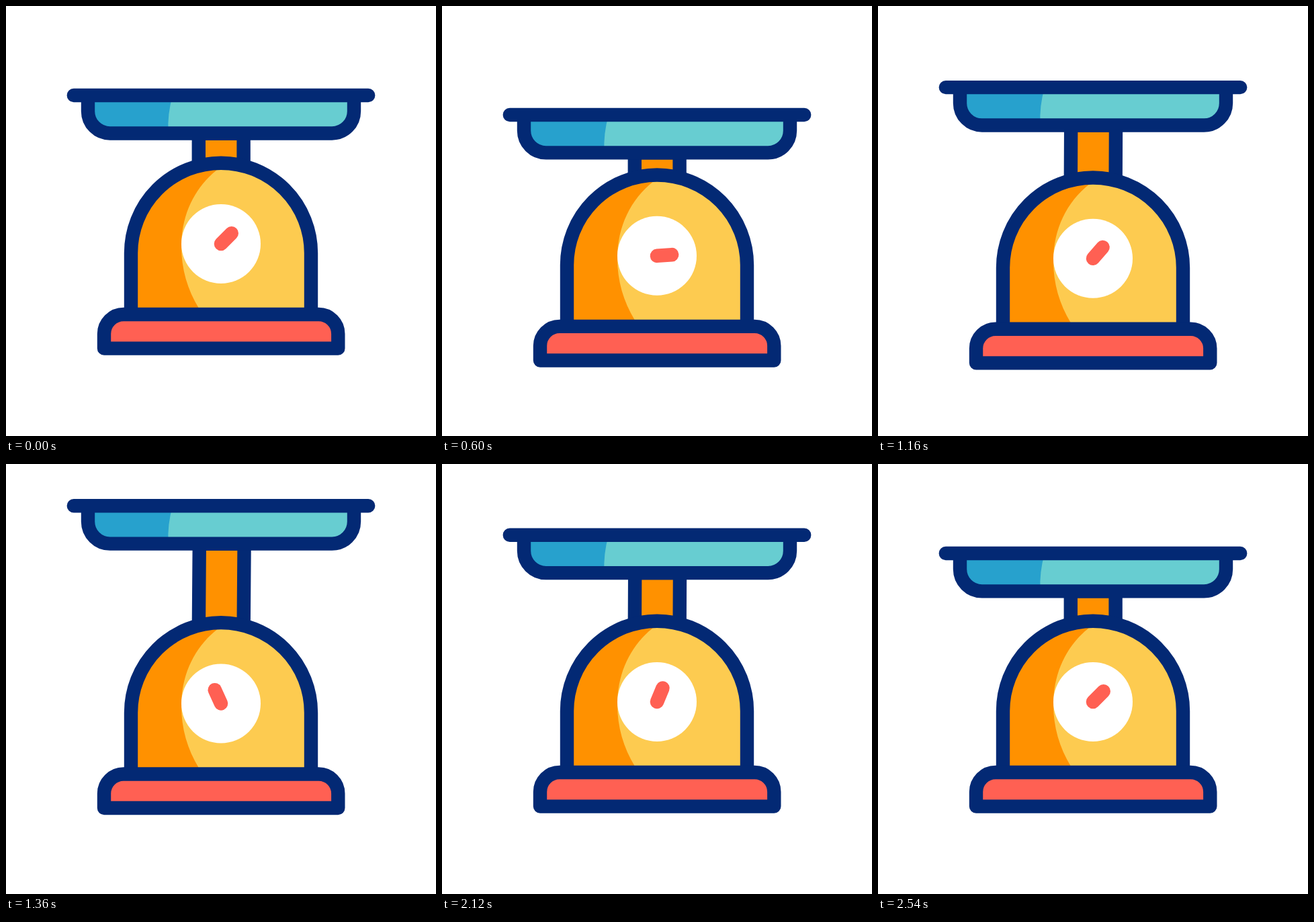
Write an HTML page that moves like this. It is 640 px wide and 640 px high and loops after 2.56 s.

```html
<!DOCTYPE html>
<html lang="en">
<head>
<meta charset="utf-8">
<title>Kitchen scale</title>
<style>
  html, body { margin: 0; height: 100%; overflow: hidden; background: #fff; }
  svg { display: block; width: 100%; height: 100%; }
  .line { fill: none; stroke: #032974; stroke-width: 20.4; stroke-linecap: round; stroke-linejoin: round; }
</style>
</head>
<body>
<svg viewBox="0 0 640 640">
  <path id="stem" class="line" style="fill:#ff9100"/>
  <g id="body">
    <path fill="#fdcb50" d="M186 459V367.7a134 134 0 0 1 268 0V459Z"/>
    <path fill="#ff9100" d="M186 459V367.7A134 134 0 0 1 320 233.7L315 243C281 270 261 310 261 358C261 391 270 422 287 450V459Z"/>
    <path class="line" d="M186 459V367.7a134 134 0 0 1 268 0V459"/>
    <path class="line" style="fill:#ff6053" d="M146 509.6V488a29 29 0 0 1 29-29H465.3a29 29 0 0 1 29 29V509.6Z"/>
    <circle cx="320" cy="354" r="59" fill="#fff"/>
    <path id="needle" d="M320 354V331.8" stroke="#ff6053" stroke-width="20.6" stroke-linecap="round"/>
  </g>
  <g id="tray">
    <path fill="#67cdd1" d="M122 133V156.6a32.8 32.8 0 0 0 32.8 32.8H485.2a32.8 32.8 0 0 0 32.8-32.8V133Z"/>
    <path fill="#27a1cd" d="M122 133V156.6a32.8 32.8 0 0 0 32.8 32.8H241.5Q240 161 248 133Z"/>
    <path class="line" d="M122 133V156.6a32.8 32.8 0 0 0 32.8 32.8H485.2a32.8 32.8 0 0 0 32.8-32.8V133M100.8 133H539.2"/>
  </g>
</svg>
<script>
  const LOOP = 2560;
  const [stem, body, needle, tray] = ['stem', 'body', 'needle', 'tray'].map(id => document.getElementById(id));

  const linear = p => p;
  const sine = p => (1 - Math.cos(Math.PI * p)) / 2;

  // Keys are [time, value, easing towards this key].
  function track(keys, t) {
    const i = keys.findIndex(key => t < key[0]);
    const [t0, v0] = keys[i - 1];
    const [t1, v1, ease = sine] = keys[i];
    return v0 + (v1 - v0) * ease((t - t0) / (t1 - t0));
  }

  const bodyKeys = [[0, 0], [1010, 30, linear], [1440, 0], [LOOP, 0]];
  const trayKeys = [[0, 0], [1000, 17], [1325, -72.5], [1520, -51], [1720, -51], [LOOP, 0]];
  const needleKeys = [[0, 45], [1000, 107], [1325, -27], [1520, 3], [1720, 3], [LOOP, 45]];

  function draw(now) {
    const t = now % LOOP;
    const bodyY = track(bodyKeys, t);
    // The tray presses into the body while sinking, then springs free of it.
    const lift = track(trayKeys, t);
    const sink = t < 1000 ? bodyY : t < 1325 ? 30 * (1 - sine((t - 1000) / 325)) : 0;
    const trayY = lift + sink;
    const lean = Math.max(0, -lift) / 70;

    body.setAttribute('transform', `translate(0 ${bodyY})`);
    tray.setAttribute('transform', `translate(0 ${trayY})`);
    needle.setAttribute('transform', `rotate(${track(needleKeys, t)} 320 354)`);
    stem.setAttribute('d', `M286.8 ${245 + bodyY}L${286.8 + lean} ${189.4 + trayY}H${353.6 + lean}L353.6 ${245 + bodyY}`);
  }

  function loop() {
    draw(performance.now());
    requestAnimationFrame(loop);
  }
  loop();
</script>
</body>
</html>
```
